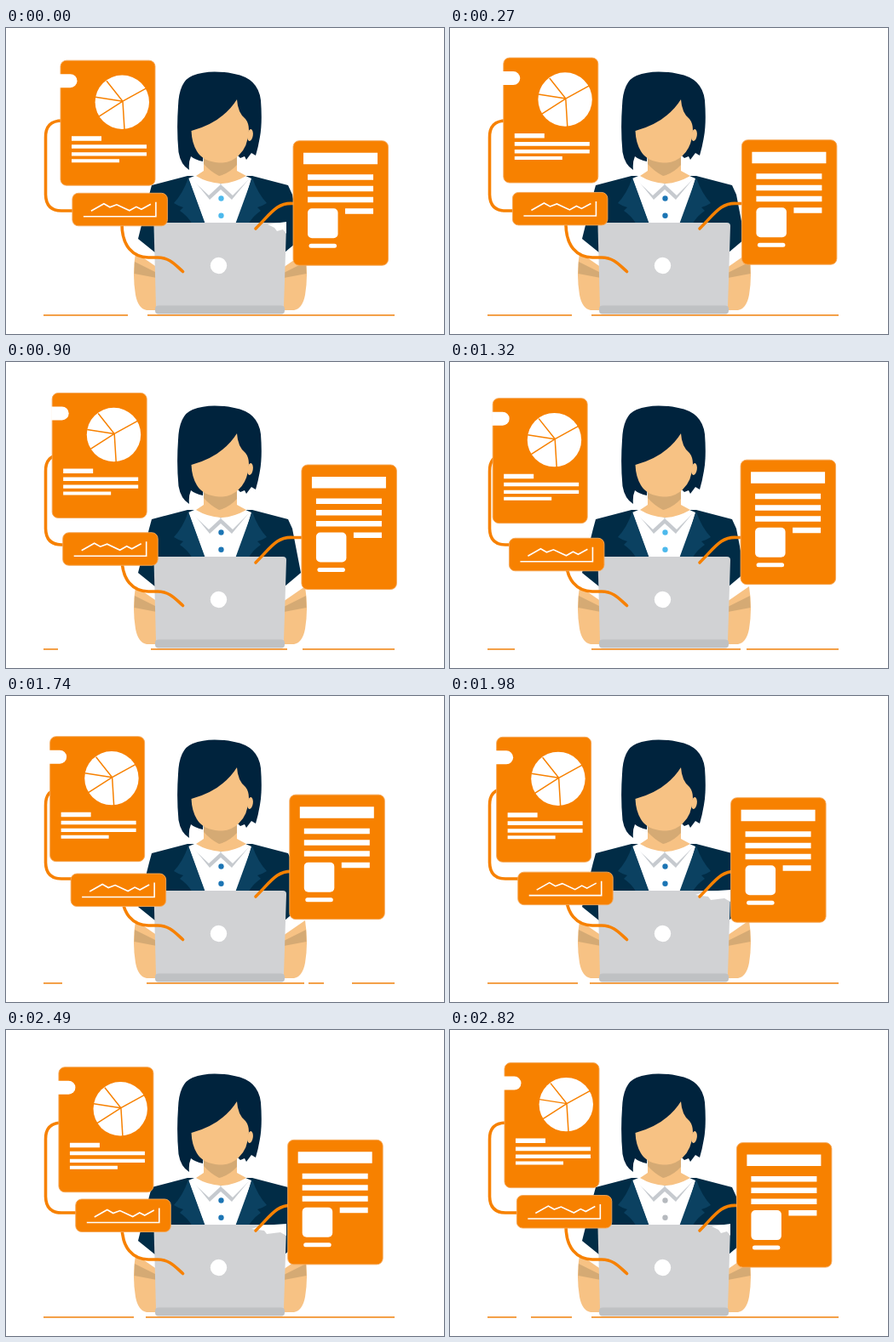
These frames come from a looping animation (514x360 px, 2.85 s). An HTML page:

```html
<!DOCTYPE html>
<html lang="en">
<head>
<meta charset="utf-8">
<style>
html, body { margin: 0; width: 100%; height: 100%; overflow: hidden; background: #fff; }
svg { display: block; width: 514px; height: 360px; }
.card { fill: #f78100; stroke: #f5a95a; stroke-width: .9; }
.wire { fill: none; stroke: #f78100; stroke-width: 3.6; stroke-linecap: round; }
.thin { fill: none; stroke: #fff; stroke-width: 1.6; }
.hair { fill: #00233d; }
.jacket { fill: #012c46; }
.lapel { fill: #0b4161; }
.skin { fill: #f7c284; }
.shade { fill: #d5aa74; }
.white { fill: #fff; }
</style>
</head>
<body>
<svg viewBox="0 0 514 360">
  <path id="ground" d="M44 337.800H456" fill="none" stroke="#f2922e" stroke-width="1.700"/>

  <!-- arms -->
  <g id="arm">
    <path class="skin" d="M351 264L325 282V332H338Q348 330 351 314Q355 290 351 264Z"/>
    <path class="shade" d="M352 275L326 288V294L352.500 289Z"/>
  </g>
  <use href="#arm" transform="translate(503) scale(-1 1)"/>

  <!-- jacket and shirt -->
  <path class="jacket" d="M171 185L213 174H289L331 185L336 196L346 248L327 264V232H176V265L155 248L168 196Z"/>
  <path class="white" d="M214 177L228 171H274L288 177L272 232H234Z"/>
  <path id="lapel" class="lapel" d="M214 176Q208 194 197 206Q203 210 208 211L204 215Q213 221 219 231H234Z"/>
  <use href="#lapel" transform="translate(503) scale(-1 1)"/>
  <path d="M222 181L239 202L252 190L265 202L284 179L276 176L252 183L228 176Z" fill="#c6cacf"/>
  <path class="white" d="M217 177L231 169L252 184L238 197Z"/>
  <path class="white" d="M286 177L272 169L252 184L266 197Z"/>
  <path class="skin" d="M232 150H271V168L282 174Q266 183 252 183Q236 182 223 174L232 168Z"/>
  <path class="shade" d="M232 152H271V161Q262 171 250 174Q240 169 232 160Z"/>
  <g id="buttons"><circle cx="252.500" cy="200.500" r="3.200"/><circle cx="252.500" cy="220.700" r="3.200"/></g>

  <!-- head -->
  <path class="hair" d="M215 167Q205 161 202.500 146Q200 120 202 92Q203 62 219 56Q239 48 268 54Q296 59 299 85Q301 112 298 128Q296 140 293 150L288 147L282 155L280 151L275 153L262 140H232L231 157Q222 155 217 151Q214 158 215 167Z"/>
  <path class="skin" d="M217.500 121Q254 111 271 84Q272 100 281 107Q285 112 285 120Q284 140 273 150Q264 159 250 158.500Q231 157 224 145Q218 135 217.500 121Z"/>
  <ellipse class="skin" cx="286.500" cy="126" rx="3.300" ry="7" transform="rotate(8 286.500 126)"/>

  <!-- laptop -->
  <path d="M178 229H325Q329 229 329 233L326 328H176L173.500 233Q174 229 178 229Z" fill="#d1d2d4"/>
  <rect x="175" y="326.500" width="152" height="10" rx="4" fill="#bfc1c3"/>
  <circle class="white" cx="249.500" cy="279.500" r="9.700"/>
  <path id="notch" class="white"/>

  <path class="wire" d="M66 109Q46 109 46.500 129V196Q47 215 65 215H82"/>
  <path class="wire" d="M136 230C136 257 149 269.500 167 270H178C192 270 199 279 207.500 286.500"/>
  <path class="wire" d="M350 206.500H337C318 205 311 218 293 236"/>

  <g id="pie">
    <rect class="card" width="111" height="147" rx="7"/>
    <path class="white" d="M-1 16H11.500A7.800 7.800 0 0 1 11.500 32H-1Z"/>
    <circle class="white" cx="72.300" cy="49" r="31.700"/>
    <path d="M102 32L73 48L45 66M75 81L73 48L54 24M73 48L41 43" fill="none" stroke="#f78100" stroke-width="1.500"/>
    <path class="white" d="M13 89h35v5.500h-35zM13 99h88v4.600h-88zM13 108h88v4.400h-88zM13 116h56v4h-56z"/>
  </g>
  <g id="chart">
    <rect class="card" width="111.500" height="38.500" rx="7"/>
    <path class="thin" d="M13 27.500H98V10.500M22 21L37 12.500L44 16.500L52 13.500L67 20.500L75 16L81 19L92 13"/>
  </g>
  <g id="page">
    <rect class="card" width="111.500" height="146.500" rx="7"/>
    <path class="white" d="M12 14h87v13.500h-87zM17 39.500h77v6.500h-77zM17 53h77v6.500h-77zM17 66h77v6.500h-77zM61 79.500h33v6.500h-33z"/>
    <rect class="white" x="17" y="79.500" width="35.500" height="35" rx="5"/>
    <rect class="white" x="18.500" y="121" width="32.500" height="5" rx="2.500"/>
  </g>
</svg>
<script>
const LOOP = 2850;
const byId = id => document.getElementById(id);

// Each card follows a tilted ellipse: centre + cosine part + sine part.
const orbits = {
  pie:   { x: [57, 7, 0],        y: [41.2, -3, -6.5] },
  chart: { x: [74.4, 3.5, -6.9], y: [201.3, -7, -3.7] },
  page:  { x: [338, -1, 9.3],    y: [123.7, 9, 1] }
};

const corner = 'M307 231L329 228V242L325 237L318 239L315 235Z';
const topEdge = 'M288 234L300 230L329 228V242L322 238L306 240L303 236Z';
// Hard changes: end time, button colour, ground dashes, missing laptop corner.
const looks = [
  [255,  '#4db9ec', '99 23 290', corner],
  [705,  '#1c75b4', '99 23 290', ''],
  [1110, '#1c75b4', '17 109 160 18 108', ''],
  [1530, '#4db9ec', '32 90 175 7 108', ''],
  [1965, '#1c75b4', '22 99 185 5 18 33 50', ''],
  [2505, '#1c75b4', '106 14 292', topEdge],
  [LOOP, '#b5b9be', '34 17 48 23 290', corner]
];

function draw(now) {
  const t = now % LOOP, a = t / LOOP * 2 * Math.PI;
  const at = ([mid, c, s]) => mid + c * Math.cos(a) + s * Math.sin(a);
  for (const id in orbits) {
    const { x, y } = orbits[id];
    byId(id).setAttribute('transform', `translate(${at(x)} ${at(y)})`);
  }
  const [, colour, dashes, notch] = looks.find(look => t < look[0]);
  byId('buttons').setAttribute('fill', colour);
  byId('ground').setAttribute('stroke-dasharray', dashes);
  byId('notch').setAttribute('d', notch);
  requestAnimationFrame(() => draw(performance.now() - start));
}

const start = performance.now();
draw(0);
</script>
</body>
</html>
```
